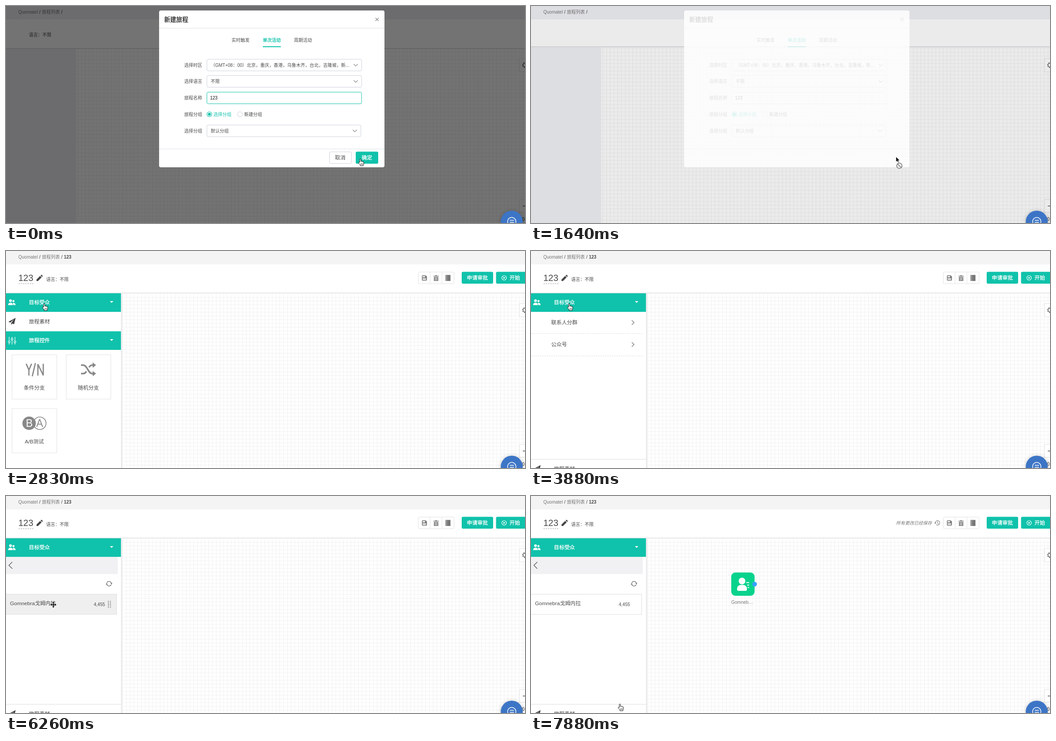
An HTML page that plays this animation: 1156x485 px, repeating every 8000 ms.

```html
<!DOCTYPE html>
<html lang="zh-CN">
<head>
<meta charset="utf-8">
<title>新建旅程</title>
<style>
html, body { margin: 0; width: 100%; height: 100%; overflow: hidden; background: #fff }
svg { display: block; width: 100%; height: 100% }
text { font: 10px "Liberation Sans", "Noto Sans CJK SC", "Noto Sans CJK", sans-serif; fill: #4a4a4a; white-space: pre }
.big { font-size: 11.7px }
.mid { text-anchor: middle }
.cur { fill: currentColor }
.white { fill: #fff }
.bold { stroke: currentColor; stroke-width: .3 }
.white.bold { stroke: #fff }
.teal { fill: #10c2ab }
.line { fill: none; stroke: #888; stroke-width: 1.2 }
.box { fill: #fff; stroke: #ccd0db }
.card { fill: #fff; stroke: #e2e2e2 }
.gray { fill: #888 }
</style>
</head>
<body>
<svg viewBox="0 0 1156 485">
<defs>
  <pattern id="grid" width="8.333" height="8.333" patternUnits="userSpaceOnUse" x="1" y="3">
    <path d="M.5 0V9M0 .5H9" stroke="#f0f0f0" fill="none"/>
  </pattern>
  <filter id="soft" x="-50%" y="-50%" width="200%" height="200%"><feDropShadow dx="0" dy="1" stdDeviation="4" flood-opacity=".25"/></filter>
  <path id="down" class="line" d="M-4.5-2.2 0 2.2 4.5-2.2"/>
  <path id="next" class="line" d="M-2.5-5 2.5 0-2.5 5" style="stroke-width:1.6"/>
  <path id="caret" d="M231.5 112h7.5l-3.75 4z"/>
  <g id="target" class="cur">
    <circle cx="10" cy="111" r="3"/><path d="M4.8 121q0-5.5 5.2-5.5t5.2 5.5z"/>
    <circle cx="16.6" cy="112" r="2.4"/><path d="M16.3 121q0-3-1.6-4.8 6.6-1.4 6.6 4.8z"/>
    <text class="big bold cur" x="51" y="119.3">目标受众</text>
    <use href="#caret"/>
  </g>
  <g id="material">
    <path d="M21.5 149.5 5.5 158l4 2 8-7-6 8v4l2.5-3 4 1.8z" fill="#444"/>
    <text class="big" x="51" y="161.8">旅程素材</text>
  </g>
  <g id="row">
    <rect x="-1" y="219.5" width="247.5" height="45" stroke="#dedede"/>
    <text class="big" x="9" y="244.3">Gomnebra戈姆内拉</text>
    <text x="195.5" y="245.7">4,455</text>
  </g>
  <path id="dots" d="M228 234.5v15m4.5-15v15" stroke="#777" stroke-width="1.8" stroke-dasharray="1.8 1.5"/>
  <path id="arrow" d="M0 0V11.5L2.7 9 4.5 13l1.9-.8L4.7 8.3H8.3z" stroke="#fff" stroke-width=".7"/>
  <g id="stop">
    <use href="#arrow"/>
    <circle cx="7.500" cy="20" r="6" fill="#eee" stroke="#777" stroke-width="1.6"/>
    <path d="M3.5 16l8 8" stroke="#777" stroke-width="1.6"/>
  </g>
  <g id="hand" stroke="#111">
    <path d="M-1.3 1.2a1.3 1.3 0 0 1 2.6 0V5.5a1.2 1.2 0 0 1 2.3 0v.4a1.2 1.2 0 0 1 2.3.2v.6a1.1 1.1 0 0 1 2 .4V10q0 1.500-1 3v2H0v-1.6q-1-2-3.6-4.4a1.3 1.3 0 0 1 1.9-1.7l.4.5z" fill="#fff"/>
    <path d="M1.5 9.5V13m2-3.5V13m2-3.5V13" stroke-width=".7"/>
  </g>
  <path id="move" d="M0-7 3-3.6H1.1v2.5h2.5V-3L7 0 3.6 3V1.1H1.1v2.5H3L0 7-3 3.6h1.9V1.1h-2.5V3L-7 0-3.6-3v1.9h2.5v-2.5H-3z" stroke="#fff" stroke-width=".5"/>
</defs>

<!-- page while the dialog is open -->
<g data-t="0-1780">
  <rect width="1156" height="485" fill="#f0f1f5"/>
  <rect y="30" width="1156" height="61" fill="#fff"/>
  <rect x="156" y="93" width="1000" height="392" fill="#fff"/>
  <rect x="156" y="93" width="1000" height="392" fill="url(#grid)" data-t="0-1490"/>
  <rect x="156" y="93" width="1000" height="392" fill="url(#grid)" data-t="1640-1780"/>
  <rect y="90" width="1156" height="2" fill="#e2e2e4" data-t="1490-1780"/>
  <g data-t="0-1490">
    <rect y="90" width="1156" height="4" fill="#fff"/>
    <rect y="94" width="1156" height="2" fill="#dedede"/>
    <text x="51" y="67.7">语言：不限</text>
  </g>
</g>

<!-- journey editor -->
<g data-t="1780-8000">
  <rect width="1156" height="485" fill="#fff"/>
  <rect width="1156" height="30" fill="#f4f4f4"/>
  <rect x="259" y="96" width="897" height="389" fill="url(#grid)"/>
  <rect y="93" width="1156" height="2" fill="#e6e6e8"/>
  <rect x="256" y="94" width="3" height="391" fill="#ececee"/>
  <text x="129" y="16.7" style="font-weight:700">123</text>
  <text x="27.5" y="67" style="font-size:20px">123</text>
  <path d="M28 73h33" stroke="#999" stroke-dasharray="3 2"/>
  <path d="M68 67v-3.3l8-8 3.3 3.3-8 8zM77 54.7l1.2-1.2q.8-.6 1.6 0l1.7 1.7q.6.8 0 1.6L80.3 58z" fill="#444"/>
  <text x="89.5" y="66.7">语言：不限</text>
  <rect class="card" x="918.5" y="47" width="79.5" height="26" rx="2"/>
  <path d="M944.5 47v26m26.500-26v26" stroke="#e2e2e2"/>
  <path d="M927.5 54.500h7.500l2.500 2.500v8q0 1-1 1h-9q-1 0-1-1v-9.500q0-1 1-1zm.5 1.800v2.700h5.500v-2.700zm0 5v3h7.500v-3z" fill="#777" fill-rule="evenodd"/>
  <path d="M952 55.5h3.500l1-1.500h3l1 1.5h3.500v1.500h-12zM953 58h10v9h-10z" class="gray"/>
  <path d="M956 59.5v6m2-6v6m2-6v6" stroke="#fff" stroke-width=".7"/>
  <path d="M979 53.5h11V67h-11z" fill="#777"/><path d="M981.5 54v13" stroke="#ddd" stroke-width=".8"/>
  <rect class="teal" x="1015" y="46.500" width="70" height="26.500" rx="3"/>
  <rect class="teal" x="1091.500" y="46.500" width="70" height="26.500" rx="3"/>
  <text class="big bold white" x="1026.600" y="64.3">申请审批</text>
  <circle cx="1109.5" cy="60" r="5" fill="none" stroke="#fff" stroke-width="1.2"/>
  <path d="M1108 57.5v5l4-2.5z" fill="#fff"/>
  <text class="big bold white" x="1121.5" y="64.3">开始</text>

  <g data-t="1780-2830"><use href="#target" color="#444"/></g>
  <g data-t="2830-8000">
    <rect class="teal" y="94.5" width="256" height="41.5"/>
    <use href="#target" color="#fff"/>
  </g>

  <g data-t="1780-3880">
    <use href="#material"/>
    <rect class="teal" y="179.5" width="256" height="41.5"/>
    <path d="M7 192v17m6.5-17v17M20 192v17" stroke="#fff" stroke-width="1.2"/>
    <g class="teal" stroke="#fff" stroke-width="1.2"><circle cx="7" cy="203" r="2"/><circle cx="13.5" cy="197" r="2"/><circle cx="20" cy="203" r="2"/></g>
    <text class="big bold white" x="51" y="204.3">旅程控件</text>
    <use href="#caret" y="85" class="white"/>
    <rect class="card" x="13.5" y="232" width="99.5" height="99"/>
    <rect class="card" x="134" y="232" width="99.5" height="99"/>
    <rect class="card" x="13.5" y="352" width="99.5" height="99"/>
    <path d="M45 252l6 14 6-14M51 265v13.5M65.5 250.500l-7 29.500M71 278.5V253l12 25V252" fill="none" stroke="#8a8a8a" stroke-width="2.8"/>
    <path d="M167 255h5c9 0 11 19 20 19h4M167 274h5q4 0 7-5m6-9q3-5 7-5h4" fill="none" stroke="#8a8a8a" stroke-width="3.6"/>
    <path d="M193 249l7.500 6-7.500 6zm0 19l7.500 6-7.500 6z" class="gray"/>
    <circle cx="51.5" cy="385" r="15" class="gray"/>
    <circle cx="75.2" cy="385" r="14" class="line" style="stroke-width:1.7"/>
    <text class="mid" x="52" y="393.2" style="font-size:23px;fill:#fff">B</text>
    <text class="mid" x="75" y="393.2" style="font-size:23px;fill:#888">A</text>
    <text class="big mid" x="63" y="310.3">条件分支</text>
    <text class="big mid" x="183.5" y="310.3">随机分支</text>
    <text class="big mid" x="63" y="430.3">A/B测试</text>
  </g>

  <g data-t="3880-8000">
    <path d="M0 465.500h256" stroke="#dcdcdf"/>
    <use href="#material" y="329"/>
  </g>
  <g data-t="3880-5520">
    <text class="big" x="45" y="164.3">联系人分群</text>
    <text class="big" x="45" y="213.3">公众号</text>
    <use href="#next" x="227" y="160"/><use href="#next" x="227" y="209"/>
    <path d="M0 184.5h250M0 234.5h250" stroke="#ddd" stroke-dasharray="3 2"/>
  </g>
  <g data-t="5520-8000">
    <rect y="136" width="249" height="38.5" fill="#f1f1f3"/>
    <path class="line" d="M14 147.5 6.5 155l7.5 7.5" style="stroke:#666;stroke-width:1.6"/>
    <path class="line" d="M224.5 194a5.5 5.5 0 0 1 10.2.5M234.5 198a5.5 5.5 0 0 1-10.2-.5" style="stroke:#666"/>
    <path d="M232.5 194.5h4.5l-2.2 3zM222 197.5h4.5l-2.2-3z" fill="#666"/>
  </g>
  <use href="#row" fill="#fff" data-t="5660-5810"/>
  <g data-t="5810-7300"><use href="#row" fill="#efefef"/><use href="#dots"/></g>
  <use href="#row" fill="#fff" data-t="7300-8000"/>

  <g data-t="7300-8000">
    <rect x="446" y="171" width="52" height="52" rx="9" fill="#08d38d"/>
    <g fill="#fff"><circle cx="470" cy="190" r="7.5"/><path d="M459 208q0-9.5 11-9.5t11 9.5q0 4-3 4h-16q-3 0-3-4z"/></g>
    <path d="M479.5 193.5h6.5m-4.5 5.5h4.500m-3.5 5.5h3.5" stroke="#fff" stroke-width="1.8"/>
    <circle cx="498" cy="197" r="5.2" fill="#35a3ff"/>
    <text x="446" y="241.2" style="fill:#777">Gomneb…</text>
  </g>
  <g data-t="7450-8000">
    <text x="813" y="63.5" style="font-style:italic;fill:#777">所有更改已经保存</text>
    <path class="line" d="M900.5 60a5 5 0 1 1 1.7 3.8M905.5 57v3.5l2.5 1.5"/>
    <path d="M898 59.5h5l-2.5 3z" class="gray"/>
  </g>
</g>

<!-- shared by both pages -->
<text x="27.5" y="16.7" style="fill:#777">Quomatel</text>
<text x="74" y="16.7" style="fill:#333">/</text>
<text x="80" y="16.7" style="fill:#777">旅程列表</text>
<text x="123" y="16.7" style="fill:#333">/</text>
<rect class="card" x="1143.5" y="117.5" width="20" height="29.5"/>
<circle class="line" cx="1156" cy="132" r="4.200" style="stroke:#555"/>
<circle class="line" cx="1156" cy="132" r="5.400" stroke-dasharray="2.1 2.14" style="stroke:#555;stroke-width:1.6"/>
<rect class="card" x="1143.5" y="432.5" width="20" height="28.5"/>
<path d="M1151 447h6" stroke="#555" stroke-width="1.5"/>
<text x="1149.5" y="479.5" style="fill:#333">0</text>
<rect id="shade" width="1156" height="485" data-t="0-1780"/>
<circle cx="1126.5" cy="482" r="24.5" fill="#3e75c6" filter="url(#soft)"/>
<path d="M1119 487a9.2 9.2 0 1 1 3.5 3l-4 1zM1122 479h9.5m-9.500 4.5h9.5" fill="none" stroke="#fff" stroke-width="1.500"/>

<!-- dialog -->
<g data-t="0-1780">
  <rect id="sheet" x="341" y="10" width="502" height="350.5" rx="4" fill="#fff"/>
  <g id="form">
    <path d="M341 49.5h502M341 319.5h502" stroke="#dfe1e6"/>
    <text x="352.5" y="35" color="#222" class="bold cur" style="font-size:13.3px">新建旅程</text>
    <path class="line" d="M823 26.5l7 7m0-7l-7 7"/>
    <text x="502.5" y="80.2">实时触发</text>
    <text class="bold cur" color="#10c2ab" x="572" y="80.2">单次活动</text>
    <text x="641.5" y="80.2">周期活动</text>
    <rect class="teal" x="572" y="90" width="40" height="2"/>
    <g id="labels"></g>
    <rect class="box" x="447.5" y="119" width="344.5" height="26" rx="3"/>
    <rect class="box" x="447.5" y="155.5" width="344.5" height="26" rx="3"/>
    <rect class="box" id="name" x="447.5" y="192.5" width="344.5" height="26" rx="3"/>
    <rect class="box" x="447.5" y="266" width="343" height="26" rx="3"/>
    <use href="#down" x="779" y="132"/><use href="#down" x="779" y="168.5"/><use href="#down" x="777" y="279"/>
    <text x="456" y="135.5">（GMT+08：00）北京，重庆，香港，乌鲁木齐，台北，吉隆坡，新...</text>
    <text x="456" y="172.2">不限</text>
    <text x="454.5" y="209" style="fill:#111">123</text>
    <path d="M471.5 199v12" stroke="#111" data-t="300-900"/>
    <circle cx="453" cy="242" r="5.5" fill="#fff" stroke="#10c2ab" stroke-width="1.2"/>
    <circle class="teal" cx="453" cy="242" r="3.2"/>
    <text class="cur" color="#10c2ab" x="462" y="245.7">选择分组</text>
    <circle class="box" cx="521" cy="242" r="5.5"/>
    <text x="530.5" y="245.7">新建分组</text>
    <text x="456" y="282.5">默认分组</text>
    <g data-t="0-1640"><rect class="box" x="720.5" y="326" width="49" height="26" rx="3"/></g>
    <g data-t="0-1350">
      <rect class="teal" x="779" y="325.5" width="50" height="27" rx="3"/>
      <text class="big mid" x="744.5" y="343.3">取消</text>
      <text class="big mid bold white" x="804" y="343.3">确定</text>
    </g>
    <g data-t="1350-1640">
      <rect x="779" y="325" width="50" height="26.5" rx="3" fill="#c5ece5"/>
      <text class="big mid" x="744.5" y="343.3" style="fill:#999">取消</text>
      <text class="big mid" x="804" y="343.3" style="fill:#b7cbc7">确定</text>
    </g>
  </g>
</g>

<g id="ghost" opacity=".65"><use href="#row" fill="#efefef"/><use href="#dots"/></g>
<use id="cursor"/>
</svg>

<script>
const $ = id => document.getElementById(id);
const LOOP = 8000;
const start = [789, 342, 'hand'];
// each leg: first step, last step, step count, end x, end y, cursor shape
const legs = [
  [150, 300, 2, 812, 338, 'hand'],
  [1350, 1350, 1, 813, 337, 'stop'],
  [1780, 1780, 1, 813, 337, 'arrow'],
  [2080, 2680, 5, 110, 140, 'arrow'],
  [2830, 2830, 1, 85, 118, 'hand'],
  [4330, 4770, 4, 136, 198, 'hand'],
  [4920, 5070, 2, 140, 208, 'hand'],
  [5810, 5810, 1, 142, 226, 'move'],
  [6110, 6260, 2, 105.5, 243, 'move'],
  [6410, 7150, 6, 479, 195, 'move'],
  [7300, 7740, 4, 230, 420, 'arrow'],
  [7880, 7880, 1, 198, 465, 'hand']
];

['选择时区', '选择语言', '旅程名称', '旅程分组', '选择分组'].forEach((label, i) => {
  $('labels').innerHTML += `<text x="397" y="${135.5 + i * 36.75}">${label}</text>`;
});

const timed = [...document.querySelectorAll('[data-t]')]
  .map(el => [el, ...el.dataset.t.split('-').map(Number)]);

function cursorAt(t) {
  let [x, y, kind] = start;
  for (const [from, to, n, endX, endY, shape] of legs) {
    if (t < from) break;
    const step = n > 1 ? Math.floor((t - from) / (to - from) * (n - 1) + 0.001) + 1 : 1;
    const p = Math.min(step / n, 1), k = p * p * (3 - 2 * p);
    x += (endX - x) * k;
    y += (endY - y) * k;
    kind = shape;
  }
  return [x, y, kind];
}

function draw() {
  const t = performance.now() % LOOP;
  for (const [el, from, to] of timed) el.style.display = t >= from && t < to ? '' : 'none';

  const fading = t >= 1640;
  $('shade').style.opacity = fading ? 0.08 : 0.55;
  $('sheet').style.opacity = fading ? 0.85 : 1;
  $('form').style.opacity = fading ? 0.15 : 1;
  $('name').style.stroke = t < 1350 ? '#10c2ab' : '';

  const [x, y, kind] = cursorAt(t);
  $('cursor').setAttribute('href', '#' + kind);
  $('cursor').setAttribute('transform', `translate(${x} ${y})`);
  $('ghost').style.display = t >= 6410 && t < 7300 ? '' : 'none';
  $('ghost').setAttribute('transform', `translate(${x - 105.5} ${y - 243})`);
  requestAnimationFrame(draw);
}
draw();
</script>
</body>
</html>
```
